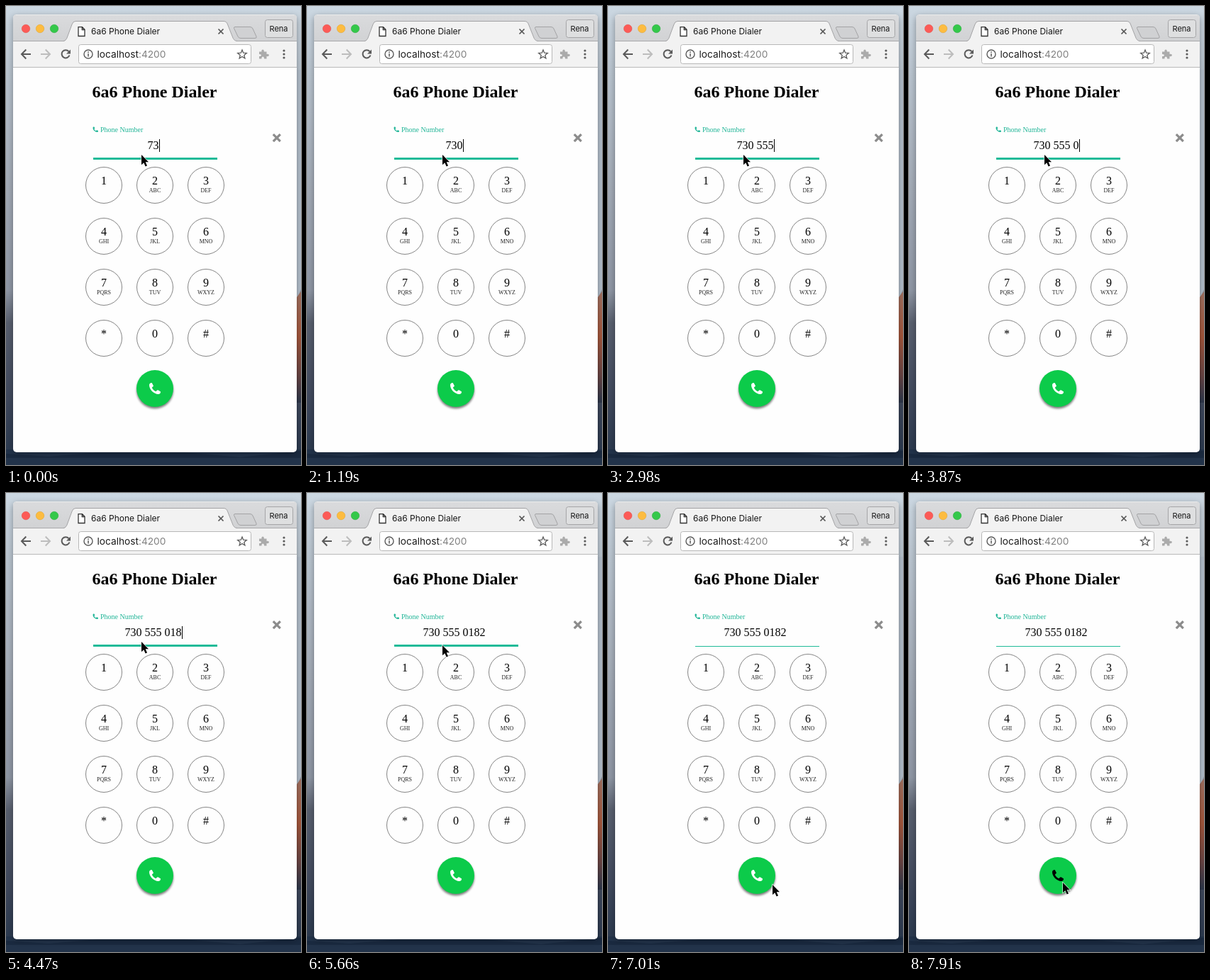
These frames come from a looping animation (416x648 px, 8 s). An HTML page:

```html
<!DOCTYPE html>
<html lang="en">
<head>
<meta charset="utf-8">
<title>Phone Dialer</title>
<style>
  html, body { margin: 0; width: 100%; height: 100%; overflow: hidden; }
  svg { display: block; }
  .ui { font-family: Inter, Roboto, sans-serif; }
  .page { font-family: "Liberation Serif", "Times New Roman", serif; }
  .mid { text-anchor: middle; }
  .line { fill: none; stroke: #5a5a5a; stroke-width: 2; }
</style>
</head>
<body>
<svg width="416" height="648" viewBox="0 0 416 648">
  <defs>
    <linearGradient id="sky" x2="0" y2="1">
      <stop offset="0" stop-color="#ccd8e2"/>
      <stop offset=".15" stop-color="#b9c4cf"/>
      <stop offset=".4" stop-color="#a3abb7"/>
      <stop offset=".62" stop-color="#8f97a5"/>
      <stop offset=".69" stop-color="#59606f"/>
      <stop offset=".85" stop-color="#414a5e"/>
      <stop offset="1" stop-color="#26364c"/>
    </linearGradient>
    <linearGradient id="ridge" x2="0" y2="1">
      <stop offset="0" stop-color="#a27262"/>
      <stop offset=".4" stop-color="#a5573c"/>
      <stop offset=".75" stop-color="#6a4544"/>
      <stop offset="1" stop-color="#2c374b"/>
    </linearGradient>
    <linearGradient id="strip" x2="0" y2="1">
      <stop offset="0" stop-color="#dadbdd"/>
      <stop offset="1" stop-color="#d1d2d4"/>
    </linearGradient>
    <filter id="windowShadow" x="-10%" y="-10%" width="120%" height="120%"><feGaussianBlur stdDeviation="5"/></filter>
    <filter id="buttonShadow" x="-20%" y="-20%" width="140%" height="140%"><feGaussianBlur stdDeviation="1.7"/></filter>
    <path id="handset" d="M3.3 0C3.9 0 4 .6 5.7 3.7C6 4.3 5.9 4.7 5.3 5.2C4.500 5.900 3.700 6.300 3.900 7C4.800 9.200 6.800 11.200 9 12.100C9.700 12.300 10.100 11.500 10.800 10.700C11.300 10.100 11.700 10 12.300 10.300C15.400 12 16 12.200 16 12.700C16 14.800 14.500 16 12.700 16C6.500 16 0 9.500 0 3.300C0 1.500 1.200 0 3.300 0Z"/>
  </defs>

  <!-- wallpaper -->
  <rect width="416" height="648" fill="url(#sky)"/>
  <path d="M405 90H416V400L405 425Z" fill="#b4bfcc"/>
  <path d="M400 425L416 403V560H400Z" fill="url(#ridge)"/>
  <rect y="626" width="416" height="22" fill="#22334a"/>
  <path d="M0 632L60 636L130 630H250L330 637L416 628V638H0Z" fill="#1a2a40"/>
  <rect x="10" y="15" width="400" height="616" rx="5" opacity=".35" filter="url(#windowShadow)"/>

  <!-- browser window -->
  <rect x="10" y="12" width="400" height="618" rx="5" fill="#fefefe"/>
  <path d="M10 50V17Q10 12 15 12H405Q410 12 410 17V50Z" fill="url(#strip)"/>
  <path d="M14 12.500H406" stroke="#eceded"/>
  <rect x="10" y="49" width="400" height="38" fill="#f2f2f2"/>
  <path d="M10 49.500H410" stroke="#a9a9ab"/>
  <path d="M10 86.500H410" stroke="#b9b9b9"/>
  <path d="M81 50C84 49 85 47 86 45L93 26Q94.500 21.500 98 21.500H307Q311 21.500 312.500 26L320 45C321 47 322 49 326 50Z" fill="#f2f2f2"/>
  <path d="M81 49.500C84 49 85 47 86 45L93 26Q94.500 21.500 98 21.500H307Q311 21.500 312.500 26L320 45C321 47 322 49 326 49.500" fill="none" stroke="#a3a3a5"/>
  <path d="M323 29.500H344Q347 29.500 348 32L353 43Q354 45.500 351 45.500H331Q328 45.500 327 43L321.500 31.500Q321 29.500 323 29.500Z" fill="#d0d1d3" stroke="#a3a3a5"/>
  <circle cx="28" cy="32" r="5.750" fill="#fc5b57" stroke="#e2463f" stroke-width=".5"/>
  <circle cx="48" cy="32" r="5.750" fill="#fdbc40" stroke="#dfa023" stroke-width=".5"/>
  <circle cx="68" cy="32" r="5.750" fill="#34c84a" stroke="#1fa832" stroke-width=".5"/>
  <path d="M102 29.700H107.500L111 33.200V42.500H102ZM107.300 29.700V33.500H111" fill="#fff" stroke="#333" stroke-width="1.300"/>
  <path d="M299.500 32.500l7 7m0-7l-7 7" stroke="#555" stroke-width="1.700"/>
  <rect x="365.500" y="19.500" width="39" height="25" rx="3" fill="#dedfe0" stroke="#a5a5a7"/>
  <g class="ui" fill="#151515">
    <text x="120" y="40" font-size="12">6a6 Phone Dialer</text>
    <text class="mid" x="384.500" y="36" font-size="11">Rena</text>
  </g>

  <!-- toolbar -->
  <path class="line" d="M35 68H22.500M28.300 61.500L22 68l6.300 6.500"/>
  <path class="line" style="stroke:#bdbdbd" d="M49 68H61.500M55.700 61.500L62 68l-6.300 6.500"/>
  <path class="line" d="M88.500 64.200A5.600 5.600 0 1 0 89.500 69.500"/>
  <path d="M91 61.500V67.500H85Z" fill="#5a5a5a"/>
  <rect x="102.500" y="54.500" width="243" height="27" rx="3" fill="#fff" stroke="#b8b8b8"/>
  <circle class="line" cx="116" cy="68" r="6" style="stroke-width:1.400"/>
  <path d="M116 67V71.500M116 64.300V65.900" stroke="#5a5a5a" stroke-width="1.500"/>
  <text class="ui" x="128.500" y="73" font-size="13.700" fill="#1c1c1c">localhost<tspan fill="#808080">:4200</tspan></text>
  <path id="star" class="line" style="stroke-width:1.300"/>
  <path d="M357 64.500H360.500C359.500 60.500 364.500 60.500 363.800 64.500H367.500V68C372 67 372 72 367.500 71V74.500H364C364.500 70.500 360 70.500 360.500 74.500H357V71C361 71.500 361 67.500 357 68Z" fill="#ababab"/>
  <g fill="#5a5a5a"><circle cx="392" cy="63" r="1.600"/><circle cx="392" cy="68" r="1.600"/><circle cx="392" cy="73" r="1.600"/></g>

  <!-- dialer page -->
  <g class="page">
    <text class="mid" x="209.500" y="129" font-size="24" font-weight="bold">6a6 Phone Dialer</text>
    <use href="#handset" transform="translate(122.500 170.500) scale(.47)" fill="#20b597"/>
    <text x="133" y="178" font-size="10" fill="#20b597">Phone Number</text>
    <path d="M378 182.300l7.600 7.600m0-7.600l-7.600 7.600" stroke="#8c8c8c" stroke-width="3.300" stroke-linecap="square"/>
    <text id="number" y="202" font-size="16"></text>
    <rect id="caret" y="188" width="1" height="18"/>
    <rect id="underline" x="123" width="175" fill="#20bb98"/>
    <g id="keys"></g>
  </g>
  <circle cx="210" cy="542.500" r="26" opacity=".5" filter="url(#buttonShadow)"/>
  <circle cx="210" cy="540" r="26" fill="#0ccb4a"/>
  <use id="callIcon" href="#handset" transform="translate(202 532)"/>

  <path id="pointer" d="M0 0V14.200L3.300 11.200L5.600 16.500L8 15.500L5.700 10.300H10Z" fill="#000" stroke="#fff" stroke-width="1.200" paint-order="stroke"/>
</svg>
<script>
const LOOP = 8000;
const PHONE = '730 555 0182';
const FIRST_LENGTH = 2;
const KEY_TIMES = [300, 1790, 2090, 2390, 2980, 3420, 3870, 4170, 4470, 4910];
const CARET_TOGGLES = [150, 300, 750, 1190, 2830, 2980, 5360, 5810, 6410];
const BLUR_TIME = 6410;
const HOVER_TIME = 7160;
// time, x, y of the pointer tip
const POINTER = [
  [0, 191, 210], [5660, 191, 215], [5810, 187, 290], [5960, 236, 444], [6110, 296, 496],
  [6410, 293, 501], [6560, 279, 518], [6710, 259, 537], [6860, 241, 550],
  [7010, 232, 553], [7160, 220, 553], [7310, 213, 553], [7760, 215, 552], [7910, 217, 550]
];

const $ = id => document.getElementById(id);
const set = (node, attrs) => {
  for (const name in attrs) node.setAttribute(name, attrs[name]);
  return node;
};
const add = (parent, tag, attrs, text = '') => {
  const node = document.createElementNS('http://www.w3.org/2000/svg', tag);
  node.textContent = text;
  return parent.appendChild(set(node, attrs));
};
const passed = (times, t) => times.filter(time => t >= time).length;

function buildKeys() {
  const labels = ['', 'ABC', 'DEF', 'GHI', 'JKL', 'MNO', 'PQRS', 'TUV', 'WXYZ'];
  [...'123456789*0#'].forEach((key, i) => {
    const x = 138 + 72 * (i % 3);
    const y = 253 + 72 * Math.floor(i / 3);
    add($('keys'), 'circle', { cx: x, cy: y, r: 25.5, fill: 'none', stroke: '#858585' });
    add($('keys'), 'text', { class: 'mid', x, y: y - 1, 'font-size': 16 }, key);
    add($('keys'), 'text', { class: 'mid', x, y: y + 10, 'font-size': 8, fill: '#222' }, labels[i]);
  });
}

function buildStar() {
  const points = Array.from({ length: 10 }, (_, i) => {
    const radius = i % 2 ? 2.9 : 6.6;
    const angle = i * Math.PI / 5;
    return `${333 + radius * Math.sin(angle)} ${68.5 - radius * Math.cos(angle)}`;
  });
  set($('star'), { d: `M${points.join('L')}Z` });
}

function render(t) {
  const text = PHONE.slice(0, FIRST_LENGTH + passed(KEY_TIMES, t));
  const width = [...text].reduce((sum, c) => sum + (c === ' ' ? 4 : 8), 0);
  set($('number'), { x: 207.5 - width / 2 }).textContent = text;
  const caretOn = passed(CARET_TOGGLES, t) % 2 === 0;
  set($('caret'), { x: Math.ceil(207.5 + width / 2), visibility: caretOn ? 'visible' : 'hidden' });

  set($('underline'), t < BLUR_TIME ? { y: 214, height: 3 } : { y: 216, height: 1 });
  set($('callIcon'), { fill: t < HOVER_TIME ? '#fff' : '#000' });

  const [, x, y] = POINTER[passed(POINTER.map(p => p[0]), t) - 1];
  set($('pointer'), { transform: `translate(${x} ${y})` });
}

buildKeys();
buildStar();
const start = performance.now();
function tick() {
  render((performance.now() - start) % LOOP);
  requestAnimationFrame(tick);
}
tick();
</script>
</body>
</html>
```
